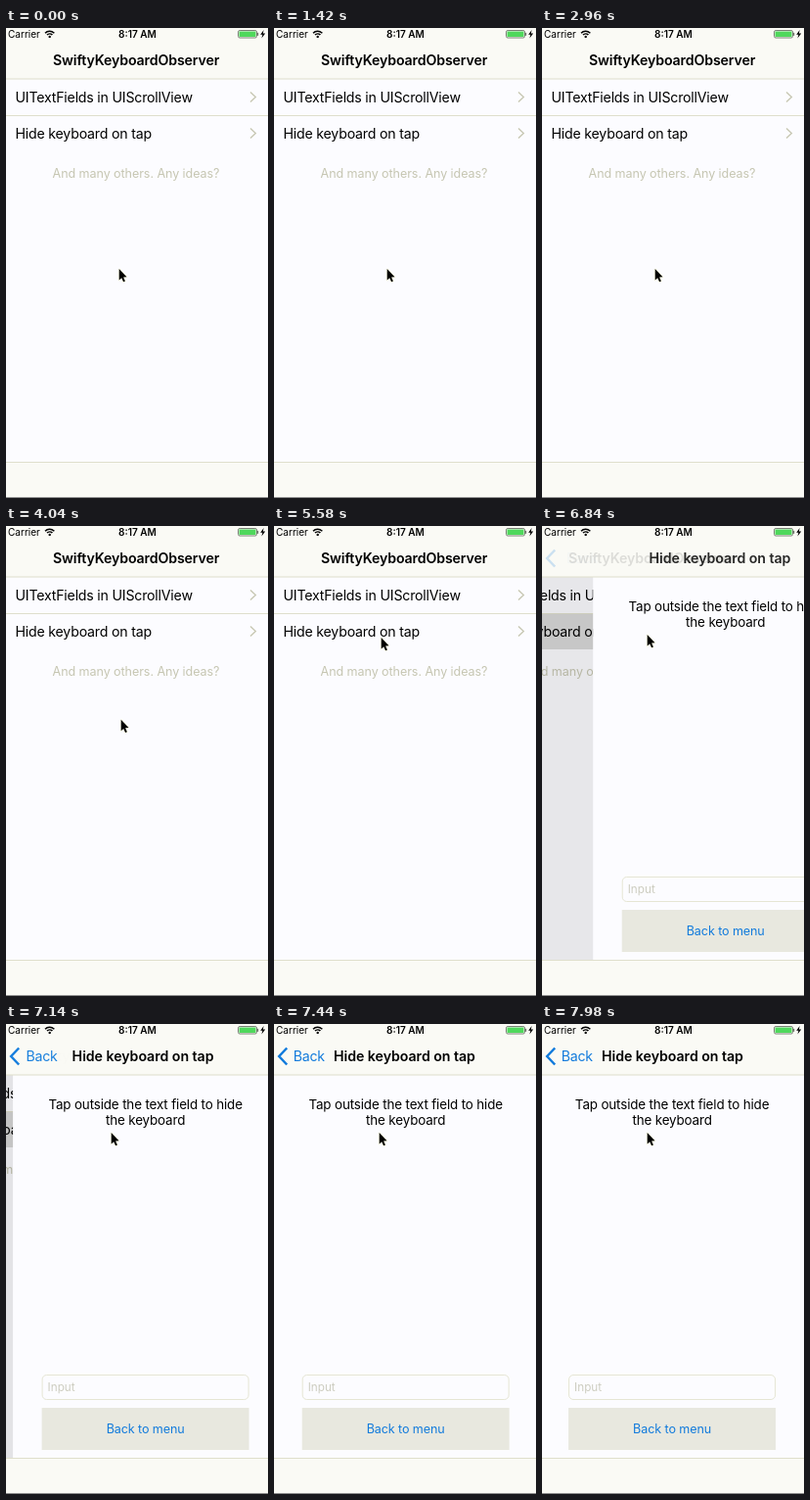
These frames come from a looping animation (268x480 px, 8 s). An HTML page with a canvas:

```html
<!DOCTYPE html>
<html lang="en">
<head>
<meta charset="utf-8">
<title>Hide keyboard on tap</title>
<style>
html, body { margin: 0; width: 100%; height: 100%; overflow: hidden; background: #fcfcff; }
canvas { display: block; width: 268px; height: 480px; }
</style>
</head>
<body>
<canvas id="stage"></canvas>
<script>
const W = 268, H = 480, LOOP = 8000;
const TAP = 6420, PUSH = 6530;
const BAR_BOTTOM = 52, TOOLBAR_TOP = 443;
const PAPER = '#fcfcff', BAR = '#fafaf5', LINE = '#dfdfcc', MUTED = '#c6c6b2', BLUE = '#127bdc';

const canvas = document.getElementById('stage');
const ctx = canvas.getContext('2d');
const dpr = window.devicePixelRatio || 1;
canvas.width = W * dpr;
canvas.height = H * dpr;

const clamp = v => Math.max(0, Math.min(1, v));
const mix = (a, b, t) => a + (b - a) * t;
const easeIn = t => t * t;
const easeOut = t => 1 - (1 - t) * (1 - t);
const easeInOut = t => t * t * (3 - 2 * t);

// Pointer stops: time, x, y and the easing used to get there.
const POINTER = [
  [3700, 115, 245, easeIn],
  [4040, 117, 197, easeIn],
  [4700, 110, 116, easeOut],
  [5580, 109, 113, easeInOut],
  [5900, 107, 110, easeInOut]
];

function rect(x, y, w, h, color) {
  ctx.fillStyle = color;
  ctx.fillRect(x, y, w, h);
}

function text(str, x, y, size, { color = '#000', weight = 400, align = 'left', track = 0 } = {}) {
  ctx.font = `${weight} ${size}px Inter, Roboto, sans-serif`;
  ctx.letterSpacing = track + 'px';
  ctx.textAlign = align;
  ctx.fillStyle = color;
  ctx.fillText(str, x, y);
}

function polyline(points, color, width) {
  ctx.beginPath();
  points.forEach(([x, y]) => ctx.lineTo(x, y));
  ctx.strokeStyle = color;
  ctx.lineWidth = width;
  ctx.stroke();
}

function polygon(points, color) {
  ctx.beginPath();
  points.forEach(([x, y]) => ctx.lineTo(x, y));
  ctx.closePath();
  ctx.fillStyle = color;
  ctx.fill();
}

function faded(alpha, draw) {
  ctx.save();
  ctx.globalAlpha = clamp(alpha);
  draw();
  ctx.restore();
}

// Overdamped spring: distance the incoming page still has to travel.
function remaining(ms) {
  if (ms <= 0) return W;
  const s = ms / 1000, slow = 5.8, fast = 30;
  return W * (fast * Math.exp(-slow * s) - slow * Math.exp(-fast * s)) / (fast - slow);
}

function pointerAt(t) {
  let prev = POINTER[0];
  for (const stop of POINTER) {
    if (t < stop[0]) {
      const k = stop[3](clamp((t - prev[0]) / (stop[0] - prev[0])));
      return [mix(prev[1], stop[1], k), mix(prev[2], stop[2], k)];
    }
    prev = stop;
  }
  return [prev[1], prev[2]];
}

function drawMenu(shift, pressed, dim) {
  ctx.save();
  ctx.translate(shift, 0);
  if (pressed) rect(0, 89, W, 37, '#d9d9d9');
  rect(0, 89, W, 1, LINE);
  text('UITextFields in UIScrollView', 9.5, 75.5, 14.2, { track: -0.22 });
  text('Hide keyboard on tap', 9.5, 113, 14.2, { track: -0.22 });
  for (const y of [70.5, 107.5]) {
    polyline([[250, y - 5], [255.3, y], [250, y + 5]], '#c8c8b4', 1.4);
  }
  text('And many others. Any ideas?', 133, 153, 12.56,
    { color: MUTED, align: 'center', track: -0.07 });
  ctx.restore();
  rect(0, BAR_BOTTOM, W, TOOLBAR_TOP - BAR_BOTTOM, `rgba(0,0,0,${dim})`);
}

function drawForm(edge, offset) {
  rect(edge, BAR_BOTTOM, W, TOOLBAR_TOP - BAR_BOTTOM, PAPER);
  ctx.save();
  ctx.translate(offset, 0);
  const label = { align: 'center', track: -0.14 };
  text('Tap outside the text field to hide', 133, 86.5, 13.4, label);
  text('the keyboard', 133, 102.5, 13.4, label);
  ctx.beginPath();
  ctx.roundRect(27.5, 358.5, 211, 25, 4.5);
  ctx.strokeStyle = '#e6e6d4';
  ctx.lineWidth = 1;
  ctx.stroke();
  text('Input', 33, 375, 11.73, { color: '#cdcdc0' });
  rect(27, 392, 212, 43, '#e8e8df');
  text('Back to menu', 133, 418, 12.56, { color: BLUE, align: 'center', track: -0.09 });
  ctx.restore();
}

function drawStatus() {
  text('Carrier', 2, 10, 10.05);
  text('8:17 AM', 134.5, 10, 10.05, { weight: 600, align: 'center' });

  ctx.strokeStyle = '#000';
  ctx.lineWidth = 1.5;
  for (const r of [3.7, 6.4]) {
    ctx.beginPath();
    ctx.arc(44.7, 9.6, r, -Math.PI * 0.76, -Math.PI * 0.24);
    ctx.stroke();
  }
  ctx.beginPath();
  ctx.arc(44.7, 8.9, 1.2, 0, Math.PI * 2);
  ctx.fillStyle = '#000';
  ctx.fill();

  ctx.beginPath();
  ctx.roundRect(237.5, 2.5, 19, 7.5, 1.6);
  ctx.strokeStyle = '#6c7468';
  ctx.lineWidth = 0.9;
  ctx.stroke();
  rect(238.5, 3.5, 17, 5.5, '#4fd85c');
  rect(257, 4.8, 1.2, 3, '#6c7468');
  polygon([[263.6, 2], [260.2, 6.7], [262.4, 6.7], [261.4, 10.4], [265.2, 5.4], [262.9, 5.4]], '#000');
}

function drawBars(progress, edge) {
  rect(0, 0, W, BAR_BOTTOM, BAR);
  rect(0, BAR_BOTTOM - 0.5, W, 1, LINE);
  rect(0, TOOLBAR_TOP, W, H - TOOLBAR_TOP, BAR);
  rect(0, TOOLBAR_TOP, W, 1, LINE);
  rect(0, H - 1, W, 1, '#8e8e8e');
  drawStatus();

  faded((1 - progress) ** 1.3, () =>
    text('SwiftyKeyboardObserver', 48 - 26 * progress, 38, 14.2, { weight: 600, track: -0.14 }));
  if (!progress) return;
  faded(progress * 1.05, () =>
    text('Hide keyboard on tap', 61 + 0.93 * edge, 38, 14.2, { weight: 600, track: -0.05 }));
  faded((progress - 0.76) / 0.22, () =>
    polyline([[13.2, 24.5], [5.2, 33], [13.2, 41.5]], BLUE, 2.5));
  faded((progress - 0.8) / 0.18, () =>
    text('Back', 19.8 + 27 * (1 - progress), 38, 14.2, { color: BLUE, track: -0.3 }));
}

function drawPointer([x, y]) {
  const arrow = [[0, 0], [0, 11.4], [2.5, 9.2], [4.4, 13.2], [6.2, 12.4], [4.4, 8.5], [7.8, 8.2]];
  ctx.save();
  ctx.translate(x + 0.7, y + 1);
  ctx.lineJoin = 'round';
  polyline([...arrow, arrow[0]], '#fdfdec', 2);
  polygon(arrow, '#000');
  ctx.restore();
}

function draw(t) {
  const offset = remaining(t - PUSH);
  const edge = t < PUSH ? W : Math.max(0, offset - 2.5);
  const progress = t < PUSH ? 0 : 1 - edge / W;

  ctx.setTransform(dpr, 0, 0, dpr, 0, 0);
  rect(0, 0, W, H, PAPER);
  if (progress < 1) drawMenu(-0.3 * W * progress, t >= TAP, 0.1 * progress);
  if (progress > 0) drawForm(edge, offset);
  drawBars(progress, edge);
  drawPointer(pointerAt(t));
}

function tick() {
  draw(performance.now() % LOOP);
  requestAnimationFrame(tick);
}
tick();
</script>
</body>
</html>
```
